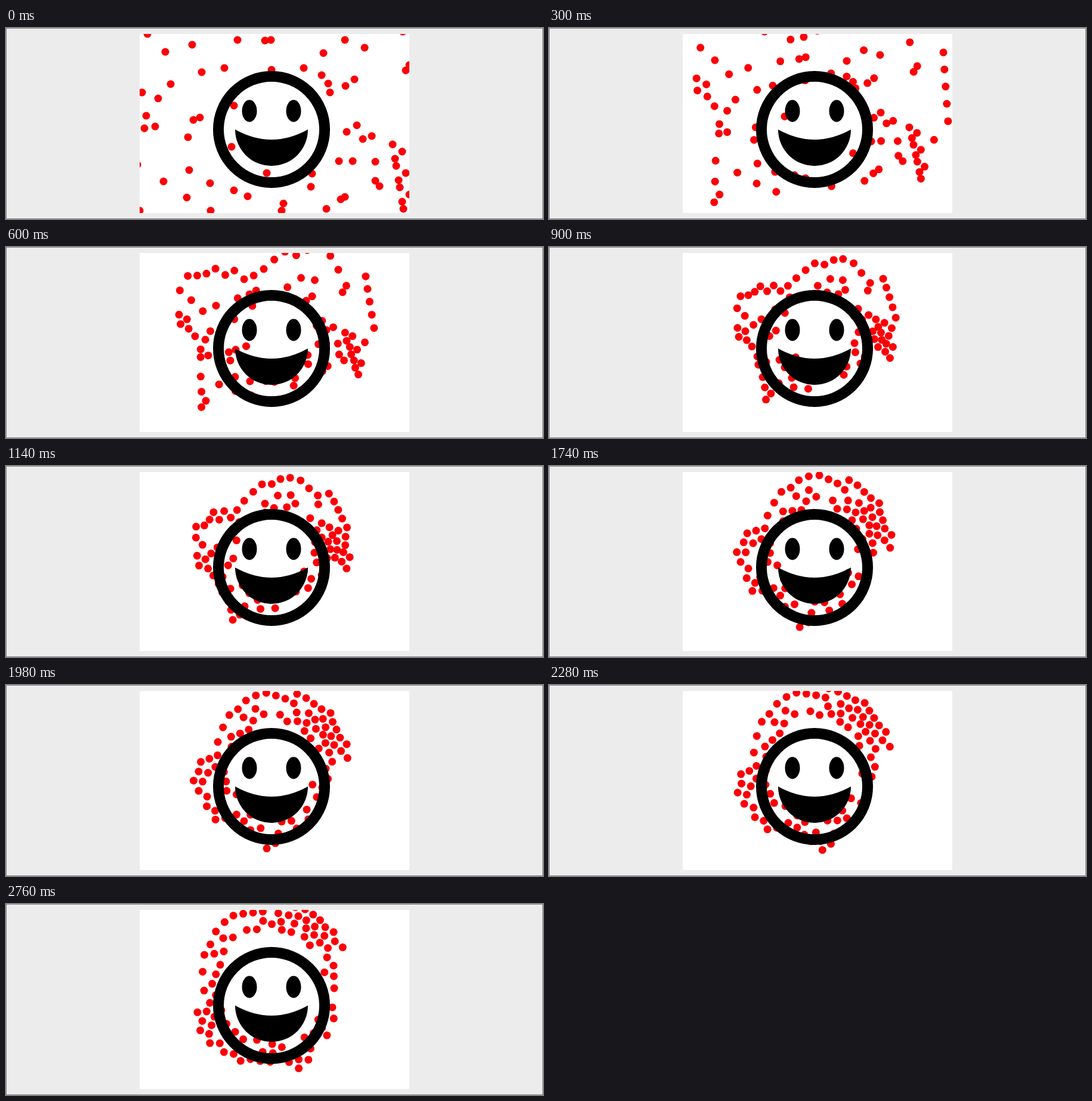
An HTML page with a canvas that plays this animation: 900x320 px, repeating every 2.82 s.

```html
<!DOCTYPE html>
<html lang="en">
<head>
<meta charset="utf-8">
<title>Swarm around a smiley</title>
<style>
  html, body { margin: 0; width: 100%; height: 100%; overflow: hidden; background: #ececec; }
  canvas { display: block; }
</style>
</head>
<body>
<canvas id="stage" width="900" height="320"></canvas>
<script>
const ctx = document.getElementById('stage').getContext('2d');
const STEP = 60, STEPS = 47;
const BOX = { x: 224, y: 10, w: 452, h: 300 };
const HUB = { x: 445, y: 139 };
const DOT = 6.5;

// Scattered dots at the start, as x, y pairs.
const START = [
  237,10, 267,40, 312,28, 328,74, 366,67, 388,20, 434,21, 444,20, 445,70,
  499,67, 532,42, 568,20, 601,33, 670,71, 529,79, 540,93, 543,108,
  569,97, 584,86, 276,94, 228,108, 255,118, 235,147, 250,165, 232,168,
  314,154, 325,150, 305,183, 382,130, 378,199, 307,238, 264,257, 303,284,
  342,260, 382,272, 405,282, 437,243, 465,294, 513,244, 511,266, 537,303,
  561,287, 568,283, 558,223, 581,223, 619,224, 571,174, 588,163, 598,186,
  613,181, 619,256, 626,265
];

function random(seed) {
  return () => (seed = (seed * 16807) % 2147483647) / 2147483647;
}

const ramp = (t, from, to) => Math.min(1, Math.max(0, (t - from) / (to - from)));

function makeDots() {
  const rnd = random(4711);
  const dots = [];
  const add = (x, y) => dots.push({ x: x - HUB.x, y: y - HUB.y });
  const row = (n, place) => {
    for (let k = 0; k < n; k++) add(...place(k));
  };
  for (let i = 0; i < START.length; i += 2) add(START[i], START[i + 1]);
  // Cluster in the lower right corner.
  row(10, k => [648 + 2 * k + (k % 3 === 1 ? 14 : 0), 195 + 12 * k]);
  // Dots on the edges and waiting outside the box.
  row(3, k => [224 + 119 * k, 306]);
  row(2, k => [665 + 11 * k, 6 + 56 * k]);
  row(16, k => [206 + 29.5 * k, -15 - 58 * rnd()]);
  row(4, k => [k % 2 ? 214 : 193, 48 + 13 * k]);
  row(3, k => [220 - 4 * k, 229 + 47 * k]);
  row(5, k => [735, 30 + 38 * k]);
  add(701, 222);
  return dots.sort((a, b) => Math.hypot(a.x, a.y) - Math.hypot(b.x, b.y));
}

function spread(dots, gap) {
  for (let i = 0; i < dots.length; i++) {
    for (let j = 0; j < i; j++) {
      const a = dots[i], b = dots[j];
      const dx = a.x - b.x, dy = a.y - b.y;
      const d = Math.hypot(dx, dy) || 1;
      if (d >= gap) continue;
      const push = 0.25 * (gap - d) / d;
      a.x += dx * push; a.y += dy * push;
      b.x -= dx * push; b.y -= dy * push;
    }
  }
}

// Dots fall towards a slowly widening ring while they circle the hub.
function advance(dots, step) {
  const inner = 44 + 18 * ramp(step, 5, 15) + 35 * ramp(step, 22, 46);
  const outer = 61 + 66 * ramp(step, 5, 15) + 16 * ramp(step, 24, 46);
  const speed = 3.6 + 0.5 * ramp(step, 0, 15);
  const next = dots.map((p, rank) => {
    const share = rank / dots.length;
    const goal = Math.sqrt(inner ** 2 + share * (outer ** 2 - inner ** 2));
    const r = Math.hypot(p.x, p.y);
    const radius = r + Math.max(-0.052 * r, 0.2 * (goal - r));
    const angle = Math.atan2(p.y, p.x) - speed / r;
    return { x: radius * Math.cos(angle), y: radius * Math.sin(angle) };
  });
  spread(next, 12 + 5 * ramp(step, 5, 20));
  return next;
}

const poses = [makeDots()];
for (let s = 1; s < STEPS; s++) poses.push(advance(poses[s - 1], s));

function drawFace() {
  ctx.fillStyle = ctx.strokeStyle = '#000';
  ctx.lineWidth = 18;
  ctx.beginPath();
  ctx.arc(445, 170, 89, 0, 2 * Math.PI);
  ctx.stroke();
  for (const x of [408, 482]) {
    ctx.beginPath();
    ctx.ellipse(x, 139, 12.5, 18.5, 0, 0, 2 * Math.PI);
    ctx.fill();
  }
  ctx.beginPath();
  ctx.moveTo(384, 170);
  ctx.quadraticCurveTo(445, 204, 506, 170);
  ctx.arc(445, 170, 61, 0, Math.PI);
  ctx.fill();
}

function draw(step) {
  ctx.fillStyle = '#ececec';
  ctx.fillRect(0, 0, 900, 320);
  ctx.strokeStyle = '#808080';
  ctx.lineWidth = 1;
  ctx.strokeRect(0.5, 0.5, 899, 319);

  ctx.save();
  ctx.beginPath();
  ctx.rect(BOX.x, BOX.y, BOX.w, BOX.h);
  ctx.clip();
  ctx.fillStyle = '#fff';
  ctx.fillRect(BOX.x, BOX.y, BOX.w, BOX.h);
  ctx.fillStyle = '#fb0007';
  for (const p of poses[step]) {
    ctx.beginPath();
    ctx.arc(HUB.x + p.x, HUB.y + p.y, DOT, 0, 2 * Math.PI);
    ctx.fill();
  }
  ctx.restore();
  drawFace();
}

const begin = performance.now();
function tick() {
  draw(Math.floor((performance.now() - begin) / STEP) % STEPS);
  requestAnimationFrame(tick);
}
tick();
</script>
</body>
</html>
```
